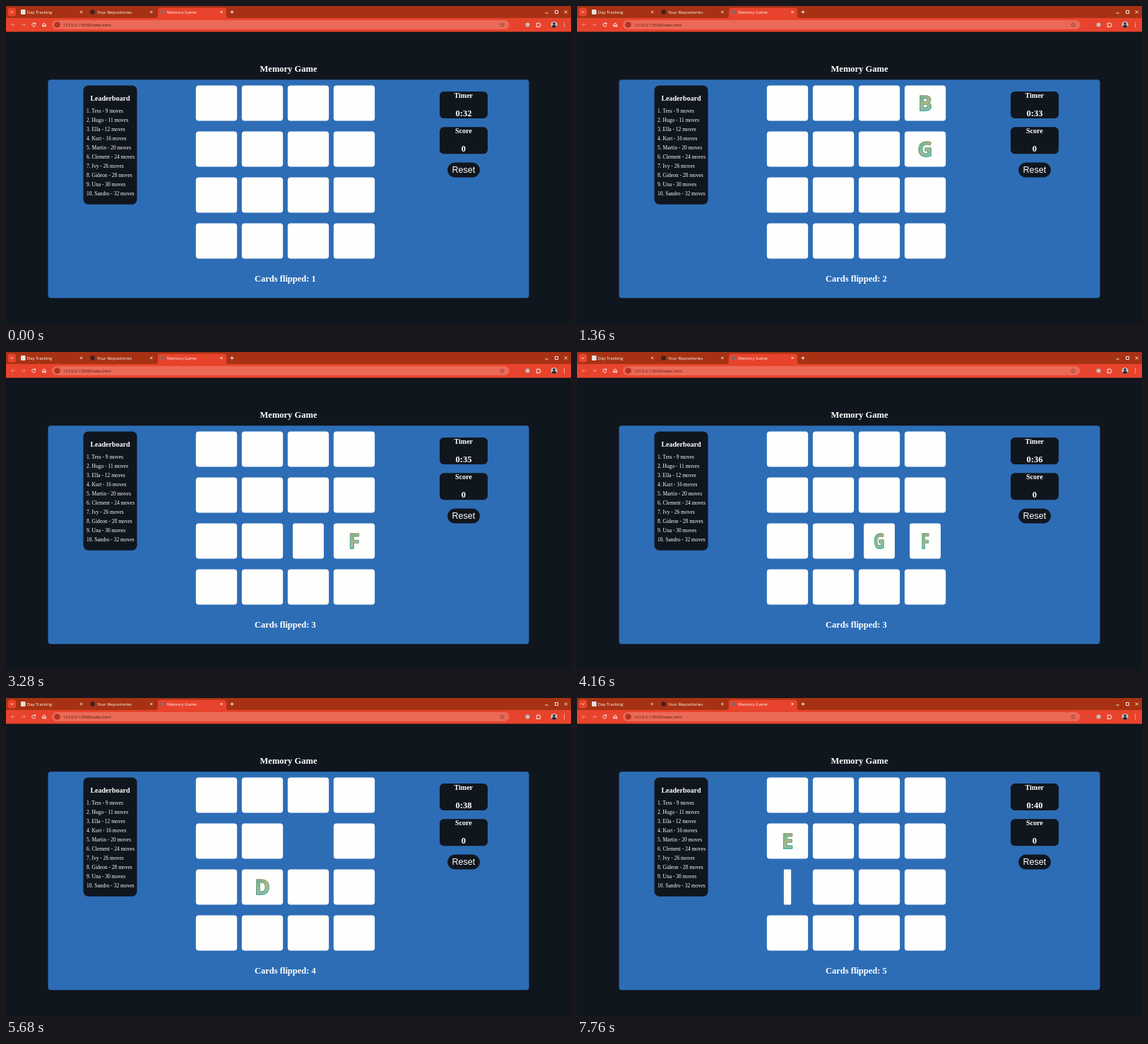
These frames come from a looping animation (800x450 px, 8000 ms). An HTML page:

```html
<!DOCTYPE html>
<html lang="en">
<head>
<meta charset="utf-8">
<title>Memory Game</title>
<style>
  html, body { margin: 0; width: 100%; height: 100%; overflow: hidden; background: #10161d; }
  svg { display: block; width: 800px; height: 450px; }
  text { fill: #fff; font-family: "Liberation Serif", "Times New Roman", serif; }
  .bold { font-weight: 700; }
  .mid { text-anchor: middle; }
  .big { font-size: 12.5px; }
  .small { font-size: 10px; }
  .row { font-size: 7.5px; }
  .ui { font: 6px "Open Sans", sans-serif; }
  .url { font-size: 5.6px; fill: #4c1910; }
  .reset { font: 12.5px "Liberation Sans", Arial, sans-serif; }
  .panel { fill: #10161d; }
  .line { fill: none; stroke: #fff; stroke-width: .9; }
  .letter text { font: 700 29px "Open Sans", sans-serif; text-anchor: middle; }
  .rim { stroke: url(#rim); stroke-width: 1.6; stroke-linejoin: round; }
  .letter .rim { fill: url(#rim); }
  .letter .foil { fill: url(#foil); stroke: url(#rim); stroke-width: 1.1; }
</style>
</head>
<body>
<svg viewBox="0 0 800 450" xmlns="http://www.w3.org/2000/svg">
  <defs>
    <linearGradient id="rim" gradientUnits="userSpaceOnUse" x1="3" y1="-12" x2="-3" y2="12">
      <stop offset="0" stop-color="#a79d78"/>
      <stop offset=".45" stop-color="#68b18d"/>
      <stop offset="1" stop-color="#38a9a9"/>
    </linearGradient>
    <linearGradient id="foil" gradientUnits="userSpaceOnUse" x1="-8" y1="-8" x2="8" y2="10">
      <stop offset="0" stop-color="#5fb59a"/>
      <stop offset=".5" stop-color="#c3b283"/>
      <stop offset="1" stop-color="#72c4b2"/>
    </linearGradient>
  </defs>

  <rect width="800" height="450" fill="#10161d"/>

  <!-- browser window -->
  <rect width="800" height="18" fill="#a73213"/>
  <rect y="17" width="800" height="19.5" fill="#e8432c"/>
  <path d="M211 17.5q4 0 4-4v-7q0-4 4-4h89q4 0 4 4v7q0 4 4 4z" fill="#e8432c"/>
  <rect x="2.5" y="2.5" width="11.5" height="12" rx="3.5" fill="#e8432c"/>
  <path class="line" d="M6.3 7.5l2 2 2-2"/>
  <rect x="21" y="5" width="6.5" height="7" rx="1" fill="#e6e3df"/>
  <circle cx="122.5" cy="8.5" r="3.4" fill="#45211b"/>
  <circle cx="221.5" cy="8.5" r="3" fill="#93645c"/>
  <text class="ui" x="29.8" y="10.6">Day Tracking</text>
  <text class="ui" x="129" y="10.6">Your Repositories</text>
  <text class="ui" x="228" y="10.6">Memory Game</text>
  <path class="line" d="M105 7l3 3m0-3l-3 3M204.300 7l3 3m0-3l-3 3M303.600 7l3 3m0-3l-3 3M317.500 8.500h5m-2.500-2.500v5"/>
  <path class="line" d="M763.500 10h4M777.500 6.500h4v4h-4zM790.700 6.500l4 4m0-4l-4 4"/>
  <path class="line" opacity=".4" d="M12.500 26.500h-5m2.300-2.300l-2.300 2.300 2.300 2.300M22 26.500h5m-2.300-2.300l2.300 2.300-2.300 2.300"/>
  <path class="line" d="M41.500 25.200a2.500 2.500 0 1 0 .2 2.100M41.700 23.500v2h-2M51.800 29v-3l2.300-2 2.300 2v3h-1.500v-1.800h-1.600v1.800z"/>
  <rect x="65" y="20" width="647.500" height="13" rx="6.500" fill="#eb6a57"/>
  <circle cx="72.500" cy="26.500" r="4.600" fill="#c93d2a"/>
  <circle cx="72.500" cy="26.500" r="2.100" fill="none" stroke="#6d2419" stroke-width=".8"/>
  <text class="ui url" x="81" y="28.500">127.0.0.1:5500/index.html</text>
  <path d="M702.500 23.400l.9 2 2.200.2-1.700 1.400.5 2.200-1.900-1.200-1.900 1.200.5-2.200-1.700-1.400 2.200-.2z" fill="none" stroke="#73382f" stroke-width=".6"/>
  <circle cx="725" cy="26.500" r="2.600" fill="#d94533"/>
  <circle cx="738.500" cy="26.500" r="3" fill="#c4bcc0"/>
  <path class="line" d="M751 24.500h1.600a1 1 0 0 1 2 0h1.400v1.600a1 1 0 0 1 0 2v1.400h-5v-1.500a1 1 0 0 0 0-2z"/>
  <circle cx="776" cy="26.500" r="4.500" fill="#c8c4c4"/>
  <path d="M772.700 29.600q.3-2.800 3.300-2.800t3.300 2.800a4.500 4.500 0 0 1-6.600 0z" fill="#292b32"/>
  <circle cx="776" cy="24.900" r="1.800" fill="#292b32"/>
  <path d="M790.500 23.800v.1m0 2.600v.1m0 2.600v.1" stroke="#fff" stroke-width="1.300" stroke-linecap="round"/>

  <!-- game page -->
  <text class="bold big mid" x="400" y="93">Memory Game</text>
  <rect x="59.500" y="104.200" width="681" height="309" rx="4" fill="#2d6db6"/>
  <rect class="panel" x="109.500" y="112.500" width="76" height="168.300" rx="7"/>
  <text class="bold small mid" x="147.500" y="134">Leaderboard</text>
  <g id="board"></g>
  <g id="cards"></g>
  <text id="count" class="bold big mid" x="395.400" y="389.500"></text>
  <rect class="panel" x="614" y="121" width="68" height="38" rx="6"/>
  <text class="bold small mid" x="647.800" y="129.800">Timer</text>
  <text id="timer" class="bold big mid" x="648" y="156.300"></text>
  <rect class="panel" x="614" y="171.200" width="68" height="38" rx="6"/>
  <text class="bold small mid" x="647.800" y="180">Score</text>
  <text class="bold big mid" x="647.800" y="206.300">0</text>
  <rect class="panel" x="625" y="221.600" width="46" height="21" rx="10.500"/>
  <text class="reset mid" x="647.800" y="236.400">Reset</text>
</svg>
<script>
const LOOP = 8000, STEP = 80, FLIP = 500, WAIT = 880;
const FIRST_SECOND = 32, TICK_AT = 545;

const holds = [[960, 160], [1760, 240], [3360, 240], [5680, 240], [6560, 160], [7760, 240]];

// Each turn opens two cards: [row, column, letter, click time]
const turns = [
  [[0, 3, "B", 100], [1, 3, "G", 733]],
  [[2, 3, "F", 2453], [2, 2, "G", 3195]],
  [[2, 1, "D", 4850], [1, 2, "D", 5533.4]],
  [[1, 0, "E", 7020], [2, 0, "A", 7627]]
];

const scores = [
  ["Tess", 9], ["Hugo", 11], ["Ella", 12], ["Kurt", 16], ["Martin", 20],
  ["Clement", 24], ["Ivy", 26], ["Gideon", 28], ["Una", 30], ["Sandro", 32]
];

const byId = id => document.getElementById(id);

function add(parent, tag, attrs, text = "") {
  const node = document.createElementNS("http://www.w3.org/2000/svg", tag);
  for (const key in attrs) node.setAttribute(key, attrs[key]);
  node.textContent = text;
  return parent.appendChild(node);
}

scores.forEach(([name, moves], i) =>
  add(byId("board"), "text", { class: "row", x: 114, y: 150.7 + 13 * i },
    `${i + 1}. ${name} - ${moves} moves`));

const cards = Array.from({ length: 16 }, (_, i) => {
  const x = 298 + 65 * (i % 4), y = 137.5 + 65 * Math.floor(i / 4);
  const group = add(byId("cards"), "g", {});
  add(group, "rect", { x: -29.15, y: -25, width: 58.3, height: 50, rx: 4, fill: "#fefefd" });
  const letter = add(group, "g", { class: "letter" });
  const layers = ["rim", "foil"].map(name => add(letter, "text", { class: name, y: 10.6 }));
  return { x, y, group, letter, layers };
});

// CSS "ease": cubic-bezier(.25, .1, .25, 1)
function ease(x) {
  if (x <= 0) return 0;
  if (x >= 1) return 1;
  let lo = 0, hi = 1;
  for (let i = 0; i < 30; i++) {
    const s = (lo + hi) / 2;
    if (.75 * s * (1 - s) + s ** 3 < x) lo = s; else hi = s;
  }
  return .3 * (1 - lo) ** 2 * lo + 3 * (1 - lo) * lo ** 2 + lo ** 3;
}

function pose(card, turned, label) {
  const angle = Math.PI * turned;
  const scale = Math.abs(Math.cos(angle));
  card.group.setAttribute("transform", `translate(${card.x} ${card.y}) scale(${scale.toFixed(4)} 1)`);
  card.letter.setAttribute("visibility", turned > .5 ? "visible" : "hidden");
  card.layers.forEach(layer => { layer.textContent = label; });
}

function render(time) {
  let t = Math.floor(time / STEP) * STEP;
  const hold = holds.find(([start, length]) => t >= start && t < start + length);
  if (hold) t = hold[0];

  cards.forEach(card => pose(card, 0, ""));
  let count = 1;
  for (const turn of turns) {
    const second = turn[1][3];
    if (t >= second) count++;
    for (const [row, col, label, click] of turn) {
      const turned = ease((t - click) / FLIP) - ease((t - second - WAIT) / FLIP);
      if (turned > 0) pose(cards[row * 4 + col], turned, label);
    }
  }
  byId("count").textContent = `Cards flipped: ${count}`;
  byId("timer").textContent = `0:${FIRST_SECOND + Math.floor((t - TICK_AT) / 1000) + 1}`;
}

const start = performance.now();
function loop() {
  render((performance.now() - start) % LOOP);
  requestAnimationFrame(loop);
}
loop();
</script>
</body>
</html>
```
